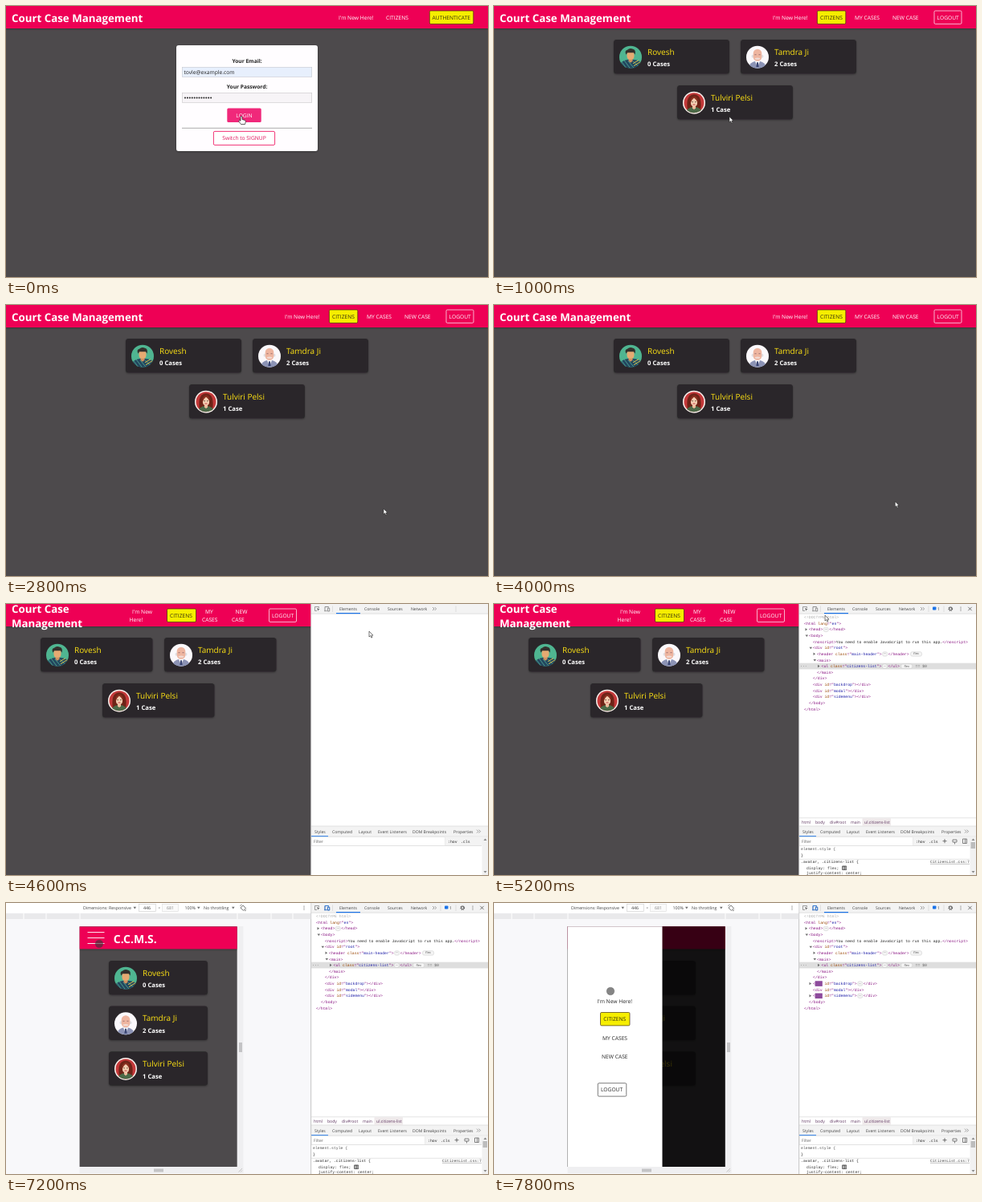
An HTML page that plays this animation: 600x338 px, repeating every 8 s.

```html
<!DOCTYPE html>
<html lang="en">
<head>
<meta charset="utf-8">
<title>Court Case Management</title>
<style>
html, body { margin: 0; width: 100%; height: 100%; overflow: hidden; background: #4d4a4c; }
svg { display: block; width: 100vw; height: 100vh; }
text { font-family: "Open Sans", "Noto Sans", sans-serif; text-rendering: geometricPrecision; }
.b { font-weight: 700; }
.m { font-family: "Liberation Mono", "DejaVu Sans Mono", monospace; }
</style>
</head>
<body>
<svg id="stage" viewBox="0 0 600 338" preserveAspectRatio="none"></svg>
<script>
const PINK = '#ee0054', YELLOW = '#f6ee00', GOLD = '#ffe314', GREY = '#4d4a4c', DARK = '#292729', BAR = '#f3f3f3', LINE = '#d0d0d0', INK = '#444';
const LOOP = 8000, STEP = 200;

const esc = s => s.replace(/&/g, '&amp;').replace(/</g, '&lt;').replace(/>/g, '&gt;');
const rect = (x, y, w, h, fill, more = '') => `<rect x="${x}" y="${y}" width="${w}" height="${h}" fill="${fill}" ${more}/>`;
const circ = (x, y, r, fill, more = '') => `<circle cx="${x}" cy="${y}" r="${r}" fill="${fill}" ${more}/>`;
const path = (d, fill, more = '') => `<path d="${d}" fill="${fill}" ${more}/>`;
const line = (d, stroke, w = .6) => path(d, 'none', `stroke="${stroke}" stroke-width="${w}"`);
const text = (x, y, s, size, fill, more = '') => `<text x="${x}" y="${y}" font-size="${size}" fill="${fill}" ${more}>${esc(s)}</text>`;
const ui = (x, y, s, fill = INK) => text(x, y, s, 5.1, fill);
const mono = (x, y, s, fill = '#222') => text(x, y, s, 4.8, fill, 'class="m"');
const group = (id, body, more = '') => `<g id="${id}" ${more}>${body}</g>`;
const caret = (x, y, open) => path(open ? `M${x} ${y - 1}h3.600l-1.800 2.600z` : `M${x} ${y - 1.8}v3.600l2.600-1.800z`, '#6e6e6e');
const dots = (x, y) => [-2, 0, 2].map(d => circ(x, y + d, .6, '#555')).join('');
const chevrons = (x, y) => line(`M${x} ${y - 2}l2 2l-2 2m2.6-4l2 2l-2 2`, '#666');

// Web app

const button = (x, y, w, s, tx, kind) => {
  const [fill, edge, ink] = kind === 'on' ? [YELLOW, '#45300c', '#38300e']
    : kind === 'dark' ? ['none', '#444', '#292929'] : ['none', '#fff', '#fff'];
  return rect(x, y, w, 16.4, fill, `rx="1.4" stroke="${edge}" stroke-width=".7"`) + text(tx, y + 10.7, s, 6.7, ink);
};
const nav = (x, y, s, ink = '#fff') => text(x, y, s, 6.7, ink);
const header = (x, y, w) => rect(x, y, w, 28, PINK, 'filter="url(#shade)"');

const faces = [
  circ(0, 0, 14, '#4fb591') + path('M-12 7Q-8 3 0 3Q9 3 12.500 6Q9 14 0 14Q-8 14-12 7Z', '#23475f') +
    line('M-11 6l5 7M-8 4l7 9.500M-3 5l7 8.500M3 5l6 6', '#4fa58f', .9) + line('M3 8l7-4M4 11l8-5', '#d9c04a', 1) +
    path('M-2.500 1h5v4l-2.500 2l-2.500-2z', '#d0925f') + rect(-4.5, -7, 9, 10, '#e6aa72', 'rx="4"') +
    path('M-5.500-3Q-8-8-4-9Q-1-12 3-10Q7-9 5.500-3L4-5.500H-4Z', '#33302c'),
  circ(0, 0, 14, '#fbf8fb') + path('M-10 10Q-7 5 0 5Q7 5 10 10Q6 14 0 14Q-6 14-10 10Z', '#8c93b5') +
    path('M-3 5h6l-3 8z', '#fff') + path('M-1 6.500h2l.6 6h-3.200z', '#3b4674') +
    circ(-5.5, -1, 2, '#dfdfe4') + circ(5.5, -1, 2, '#dfdfe4') +
    rect(-5.3, -10, 10.6, 15, '#eeb5a0', 'rx="5.300"') + path('M-3.500 1.500Q0 0 3.500 1.500L2.500 3H-2.500Z', '#f1dcd6') +
    line('M-3.500-3h2m3 0h2', '#7a5560', .7),
  circ(0, 0, 14, '#fbf3ef') + circ(0, 0, 12.5, '#c4393a') +
    path('M-8 10Q-11-10 0-10.500Q11-10 8 10Z', '#6e2418') + path('M-9 9Q-5 5 0 5Q5 5 9 9Q5 12.500 0 12.500Q-5 12.500-9 9Z', '#4c6a48') +
    path('M-2 3h4v3.500l-2 2l-2-2z', '#eebb9c') + rect(-4, -6, 8, 10.5, '#f4ceb2', 'rx="4"') +
    path('M-4.500 1Q-5-8 1-8Q5.500-7 4.500 1Q4-3 0-6Q-3-4-4.500 1Z', '#8a3020') +
    line('M-1.500 2.300h3', '#c2333a', .9) + line('M-2.700-1h1.700m2 0h1.700', '#432', .8)
];
const people = [['Rovesh', '0 Cases'], ['Tamdra Ji', '2 Cases'], ['Tulviri Pelsi', '1 Case']];
const card = (i, x, y, w) => `<g transform="translate(${x} ${y})">` +
  rect(0, 0, w, 42.5, DARK, 'rx="3.500" filter="url(#shade)"') +
  `<g transform="translate(21 21.700)">${faces[i]}</g>` +
  text(42, 18.8, people[i][0], 10, GOLD) + text(42, 33.4, people[i][1], 7.7, '#fff', 'class="b"') + '</g>';
const cards = (spots, w) => spots.map(([x, y], i) => card(i, x, y, w)).join('');

const title = text(7, 19.6, 'Court Case Management', 13.3, '#fff', 'class="b"');
const label = (y, s) => text(300, y, s, 6.65, '#222', 'class="b" text-anchor="middle"');

const login = rect(0, 0, 600, 338, GREY) + header(0, 0, 600) + title +
  nav(414, 17, "I'm New Here!") + nav(473, 17, 'CITIZENS') + button(527.3, 6, 54.5, 'AUTHENTICATE', 530.6, 'on') +
  rect(212, 49, 176, 132, '#fffdff', 'rx="3" filter="url(#shade)"') +
  label(71, 'Your Email:') + rect(219.3, 76.3, 161.4, 12, '#e7effd', 'stroke="#c5c8d0" stroke-width=".6"') +
  text(221.5, 84.7, 'tovle@example.com', 6.7, '#222') +
  label(103, 'Your Password:') + rect(219.3, 108.3, 161.4, 12, '#f7f4f7', 'stroke="#c9c6c9" stroke-width=".6"') +
  Array.from({ length: 12 }, (_, i) => circ(223 + i * 2.92, 114.6, 1, '#222')).join('') +
  rect(275.3, 127.5, 42.4, 17.5, '#f0287a', 'rx="1.500"') + text(296.5, 139, 'LOGIN', 6.7, '#fff', 'text-anchor="middle"') +
  line('M219 152.300H381', '#999', .8) +
  rect(258.4, 156.4, 76.2, 17, '#fff', `rx="1.500" stroke="${PINK}" stroke-width=".8"`) +
  text(296.5, 167.4, 'Switch to SIGNUP', 6.7, '#e0165e', 'text-anchor="middle"');

const list = rect(0, 0, 600, 338, GREY) + header(0, 0, 600) + title +
  nav(347, 17, "I'm New Here!") + button(402.4, 6, 35.4, 'CITIZENS', 406, 'on') +
  nav(449, 17, 'MY CASES') + nav(496, 17, 'NEW CASE') + button(548, 6, 34, 'LOGOUT', 551.6) +
  cards([[149, 42], [307, 42], [228, 99]], 144);

const narrow = rect(0, 0, 380, 338, GREY) + header(0, 0, 380) +
  text(7, 10.5, 'Court Case', 13.3, '#fff', 'class="b"') + text(7, 29.2, 'Management', 13.3, '#fff', 'class="b"') +
  nav(157, 12, "I'm New") + nav(153.5, 22, 'Here!') + button(200.5, 6, 36, 'CITIZENS', 204, 'on') +
  nav(248, 12, 'MY') + nav(244, 22, 'CASES') + nav(285.5, 12, 'NEW') + nav(281, 22, 'CASE') + button(327.5, 6, 34, 'LOGOUT', 331) +
  cards([[43, 42], [197, 42], [120, 99]], 139.5);

// Developer tools

const rowY = i => 16.5 + i * 7.633;
const markup = s => esc(s)
  .replace(/&gt;([^&]+)&lt;/, '&gt;<tspan fill="#222">$1</tspan>&lt;')
  .replace(/([\w-]+)="([\w-]+)"(?=&gt;)/, '<tspan fill="#994500">$1</tspan>="<tspan fill="#1a1aa6">$2</tspan>"');
const code = (x, y, s) => `<text class="m" x="${x}" y="${y}" font-size="4.8" fill="#881280">${markup(s)}</text>`;
const chip = (x, y, s, w) => rect(x, y - 2.6, w, 5.4, '#f4f4f4', 'rx="2" stroke="#c8c8c8" stroke-width=".5"') +
  text(x + w / 2, y + 1.2, s, 3.9, '#555', 'text-anchor="middle"');

// mark: 1 open, 0 closed, none for no arrow
const row = (i, x, tag, mark, close = '', flex) => {
  const y = rowY(i), end = x + tag.length * 2.88;
  let out = code(x, y + 1.6, tag);
  if (mark !== undefined) out += caret(x - 4.5, y, mark);
  if (close) out += chip(end + 1, y, '···', 6) + code(end + 8, y + 1.6, close);
  if (flex) out += chip(end + 10 + close.length * 2.88, y, 'flex', 14);
  return out;
};
const flash = i => rect(399.6, rowY(i) - 3.2, 9.2, 6.6, '#8d4a9c');

const tabs = [[415, 'Elements'], [446, 'Console'], [475, 'Sources'], [504, 'Network']].map(([x, s]) => ui(x, 8.2, s)).join('');
const panes = [[384, 'Styles'], [406, 'Computed'], [439, 'Layout'], [463, 'Event Listeners'], [506, 'DOM Breakpoints'], [557, 'Properties']]
  .map(([x, s]) => ui(x, 285.6, s)).join('');
const deviceIcon = c => line('M397 8V3.500h4.500v1M396 8.700h3.500M400.300 5.200h2.400v3.800h-2.400z', c, .8);

const tools = rect(379.5, 0, 220.5, 338, '#fff') + rect(380, 0, 220, 12, BAR) + line('M380 12.200H600', LINE) +
  line('M387 8.500h-2.500V3.500h5v1.500', '#777', .7) + path('M387 5l3.800 1.600l-1.700 .5l-.6 1.700z', '#666') + deviceIcon('#777') +
  line('M406.500 2.500v7.500', LINE) + tabs + rect(411, 11, 30, 1.2, '#1a73e8') + chevrons(531, 6) +
  rect(380, 277, 220, 13, BAR) + line('M380 277H600M380 290.200H600', LINE) + panes + chevrons(586, 283.6) +
  rect(380, 289.2, 21, 1.1, '#1a73e8') +
  rect(380, 290.5, 220, 11, BAR) + line('M380 301.500H592', LINE) +
  rect(592.5, 290.5, 7.5, 47.5, '#f1f1f1') + path('M594.500 295l2-2.500l2 2.500zM594.500 333l2 2.500l2-2.500z', '#888') +
  line('M379.700 0V338', '#bbb');

const filter = (w, x) => rect(380.5, 290.8, w, 10.4, '#fff', 'stroke="#ddd" stroke-width=".5"') + ui(383, 297.8, 'Filter', '#666') +
  mono(x, 297.6, ':hov') + mono(x + 16, 297.6, '.cls');

const empty = filter(166, 550) + line('M560 2.500v7.500', LINE);

const tree = line('M541 2.500v7.500M560 2.500v7.500', LINE) + rect(546, 3.5, 4.4, 4, '#1a73e8', 'rx=".8"') + ui(552, 8, '1') +
  circ(568.3, 6, 2.2, 'none', 'stroke="#555" stroke-width="1.300" stroke-dasharray="1.100 .6"') + circ(568.3, 6, 1.5, 'none', 'stroke="#555" stroke-width=".7"') +
  dots(581, 6) + line('M590.300 3.800l4.400 4.400m0-4.400l-4.400 4.400', '#555', .8) +
  rect(380, rowY(8) - 3.9, 220, 7.8, '#dedede') + mono(381, rowY(8) + 1.2, '···', '#666') +
  mono(386, rowY(0) + 1.6, '<!DOCTYPE html>', '#aaa') +
  row(1, 386, '<html lang="en">') + row(2, 392, '<head>', 0, '</head>') + row(3, 392, '<body>', 1) +
  row(4, 397, '<noscript>You need to enable JavaScript to run this app.</noscript>') +
  row(5, 397, '<div id="root">', 1) + row(6, 402, '<header class="main-header">', 0, '</header>', true) +
  row(7, 402, '<main>', 1) + row(8, 407.5, '<ul class="citizens-list">', 0, '</ul>', true) + mono(524.5, rowY(8) + 1.6, '== $0', '#666') +
  row(9, 402, '</main>') + row(10, 397, '</div>') + row(12, 397, '<div id="modal"></div>') +
  row(14, 392, '</body>') + row(15, 386, '</html>') +
  group('calm', row(11, 397, '<div id="backdrop"></div>') + row(13, 397, '<div id="sidemenu"></div>')) +
  group('busy', row(11, 397, '<div id="backdrop">', 0, '</div>') + row(13, 397, '<div id="sidemenu">', 0, '</div>') + flash(11) + flash(13)) +
  line('M380 266.800H600', LINE) + rect(458.5, 267.2, 35.5, 9.6, '#efeaeb') +
  [[383, 'html'], [400, 'body'], [418, 'div#root'], [444, 'main'], [461, 'ul.citizens-list']].map(([x, s]) => ui(x, 273.8, s, '#5e3560')).join('') +
  filter(141, 525) + line('M558.500 295.700h5m-2.500-2.500v5', '#555', .8) + line('M571 294h5v3h-5zM573.500 297v2.500M583.500 293h5v5.500h-5zM586.500 293v5.500', '#666', .8) +
  rect(593.5, 297, 5.5, 8, '#bdbdbd') +
  mono(382, 307.4, 'element.style {', '#555') + mono(382, 314.6, '}') + line('M380 318.300H592', LINE) +
  mono(382, 323.4, '.avatar, .citizens-list {') + mono(543, 323.4, 'CitizenList.css:7', '#444') + line('M543 324.300H592', '#666', .4) +
  mono(389, 330.8, 'display: flex;', '#333') +
  rect(433.2, 326.6, 5.8, 5.4, '#555', 'rx=".8"') + line('M434.500 328h1v2.800h-1zM437 328h1v2.800h-1z', '#fff', .5) +
  mono(389, 337.4, 'justify-content: center;', '#333');

// Device view

const bar = (s, x, fill = INK) => text(x, 8, s, 5.3, fill);
const device = rect(0, 0, 379.4, 338, '#f8f8fa') + rect(0, 0, 379.4, 12.5, '#fff') +
  bar('Dimensions: Responsive', 96) + caret(158.5, 5.8, true) +
  rect(165.5, 1.5, 21, 9, '#fff', 'stroke="#ccc" stroke-width=".6"') + bar('446', 171, '#333') + bar('×', 189.3, '#888') +
  rect(194.5, 1.5, 20, 9, '#fafafa', 'stroke="#ddd" stroke-width=".6"') + bar('681', 200, '#888') +
  bar('100%', 222.5) + caret(238, 5.8, true) + bar('No throttling', 246) + caret(281, 5.8, true) +
  line('M292 6l3-3l3.500 3.500l-3 3zM291.500 3.500l2-1.500M299 8.500l-2 1.500', '#555', .8) + dots(371, 6) +
  rect(0, 13, 379.4, 7, '#e9e9eb') + line('M22 13v7M50 13v7M92 13v7M288 13v7M330 13v7M357 13v7', '#fff', 1) +
  rect(288, 29, 7.5, 308, '#efeff1') + rect(91.5, 329, 204, 8, '#efeff1') +
  rect(290, 174, 4, 12, '#c4c4c6') + rect(184, 331.5, 12, 4, '#c4c4c6') + line('M289.500 335.500l4.500-4.500m-2 4.500l2-2', '#aaa') +
  '<g clip-path="url(#screen)">' + rect(91, 29, 198, 301, GREY) + header(85, 29.3, 210) +
  line('M101.500 36.500h21M101.500 43.500h21M101.500 50.500h21', '#fff', .9) + text(133.8, 49.6, 'C.C.M.S.', 14, '#fff', 'class="b"') +
  cards([[128, 72], [128, 128.6], [128, 185.2]], 123) +
  group('backdrop', rect(91, 29, 198, 301, '#000', 'opacity=".77"')) +
  group('drawer', rect(91, 29, 118.5, 301, '#fff') +
    nav(128.5, 124.5, "I'm New Here!", '#292929') + button(132.5, 136.5, 36.5, 'CITIZENS', 136.3, 'on') +
    nav(135, 171, 'MY CASES', '#292929') + nav(134, 194.3, 'NEW CASE', '#292929') + button(129.3, 224.7, 35.5, 'LOGOUT', 133, 'dark')) +
  '</g>' +
  group('inspect', rect(91.6, 65, 9.9, 170, '#f6b26b', 'opacity=".66"') + rect(278, 65, 9.7, 170, '#f6b26b', 'opacity=".66"') +
    rect(101.5, 65, 176.5, 170, '#6fa8dc', 'opacity=".6"') +
    [101.5, 257.5].map(x => rect(x, 65, 20.5, 170, '#6a4fc4', 'opacity=".6"') + rect(x, 65, 20.5, 170, 'url(#hatch)')).join('') +
    path('M92 65.500H288M101.500 122H278M101.500 178.700H278M92 235H288M101.500 65V235M122 65V235M257.500 65V235M278 65V235', 'none',
      'stroke="#6a2cc0" stroke-width=".7" stroke-dasharray="1.500 1"') +
    rect(92.5, 48.5, 93.5, 13.5, '#fff', 'rx="1.200" filter="url(#shade)"') + path('M94 61.500l3.500 3.500l3.500-3.500z', '#fff') +
    rect(96.5, 52.5, 7, 5, '#dbe7fb', 'rx=".8" stroke="#6f9fe8" stroke-width=".7"') + line('M98.800 53v4M101.200 53v4', '#6f9fe8', .6) +
    text(106.5, 57.2, 'ul.citizens-list', 5.3, '#881280', 'class="b"') + text(149.5, 57.2, '401.39 × 387', 5.1, '#777'));

const cursors =
  group('hand', path('M-1 0q1.200-1 2 0v3.500l3.500 1q1 .5.800 2l-.8 3h-5l-3-4q.5-1.500 2.500-.3z', '#fff', 'stroke="#222" stroke-width=".7"')) +
  group('arrow', path('M0 0v7l1.600-1.400l1.200 2.500l1.200-.6l-1.200-2.400h2.100z', '#fff', 'stroke="#222" stroke-width=".6"')) +
  group('touch', circ(0, 0, 4.8, '#333', 'fill-opacity=".6" stroke="#444" stroke-opacity=".5" stroke-width=".6"'));

const stage = document.getElementById('stage');
stage.innerHTML = `<defs>
  <filter id="shade" x="-10%" y="-20%" width="120%" height="150%"><feDropShadow dx="0" dy=".8" stdDeviation="1.100" flood-opacity=".35"/></filter>
  <clipPath id="screen">${rect(91.6, 29.3, 196.1, 299.7, '#000')}</clipPath>
  <pattern id="hatch" width="2.800" height="2.800" patternUnits="userSpaceOnUse" patternTransform="rotate(-45)">${rect(0, 0, 1, 2.8, '#5420a8', 'opacity=".6"')}</pattern>
</defs>` + group('login', login) + group('list', list) + group('narrow', narrow) +
  group('tools', tools + group('empty', empty) + group('tree', tree) + group('active', deviceIcon('#1a73e8'))) +
  group('device', device) + group('cursor', cursors);

// Motion

const el = {};
stage.querySelectorAll('g[id]').forEach(g => el[g.id] = g);
const show = (id, on) => el[id].style.display = on ? '' : 'none';

const track = [
  [0, 293, 138], [1000, 293, 138], [1800, 380, 131], [2400, 380, 131], [2800, 470, 254], [3400, 508, 284],
  [3800, 508, 284], [4600, 452, 34], [4800, 448, 30], [5400, 399.5, 8.5], [6200, 399.5, 8.5],
  [7200, 116, 51], [7400, 113, 46], [7600, 122, 70], [7800, 145, 110]
];
function pointer(t) {
  const i = track.findIndex(k => k[0] > t);
  if (i < 0) return track[track.length - 1].slice(1);
  const [t0, x0, y0] = track[i - 1], [t1, x1, y1] = track[i];
  const k = (t - t0) / (t1 - t0), e = k * k * (3 - 2 * k);
  return [x0 + (x1 - x0) * e, y0 + (y1 - y0) * e];
}

function draw(time) {
  const t = Math.floor(time % LOOP / STEP) * STEP;
  const inDevice = t >= 5400, docked = t >= 4400, menu = t >= 7600;
  show('login', t < 800);
  show('list', t >= 800 && !docked);
  show('narrow', docked && !inDevice);
  show('tools', docked);
  show('empty', t < 4800);
  show('tree', t >= 4800);
  show('active', inDevice);
  show('device', inDevice);
  show('inspect', inDevice && t < 6000);
  show('calm', !menu);
  show('busy', menu);
  show('backdrop', menu);
  show('drawer', menu);
  const slide = Math.min(1, Math.max(0, (t - 7400) / 400));
  el.drawer.setAttribute('transform', `translate(${-117.5 * (1 - slide)} 0)`);

  const [x, y] = pointer(t);
  const touch = inDevice && x < 288 && y > 28, hand = t < 800;
  show('hand', hand);
  show('touch', touch);
  show('arrow', !hand && !touch);
  el.cursor.setAttribute('transform', `translate(${x} ${y})`);
}

const start = performance.now();
(function tick() {
  draw(performance.now() - start);
  requestAnimationFrame(tick);
})();
</script>
</body>
</html>
```
